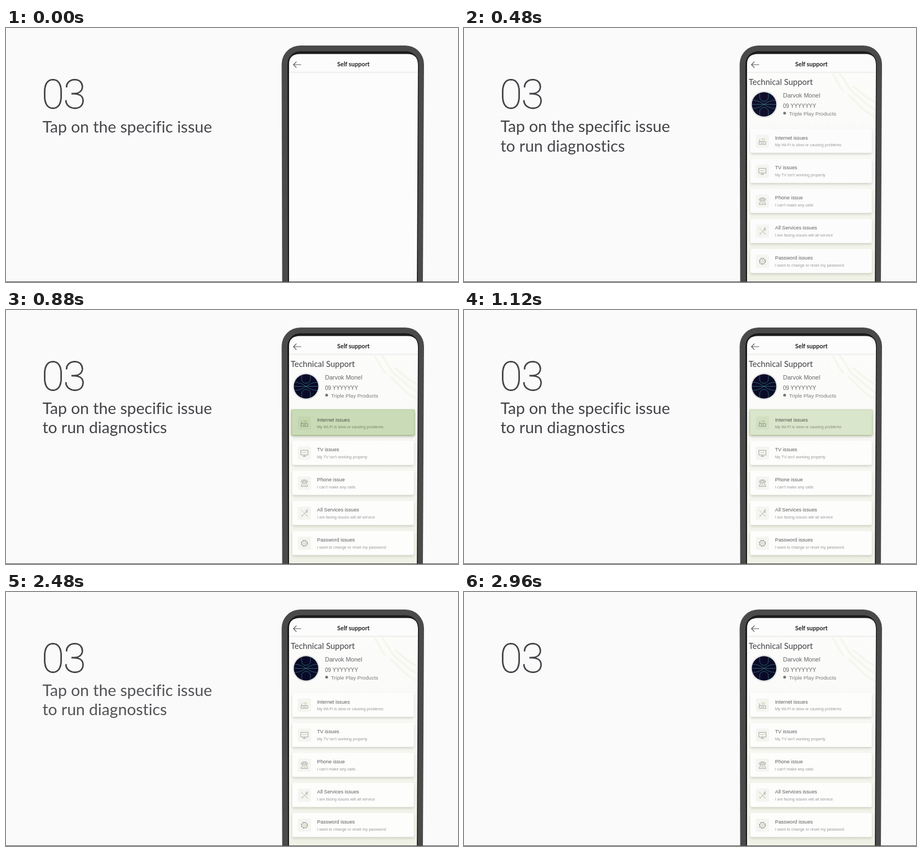
Recreate the animation shown at these times as an HTML page. Size 824 by 464 pixels, loop 3040 ms.

```html
<!DOCTYPE html>
<html lang="en">
<head>
<meta charset="utf-8">
<title>Self support</title>
<style>
  html, body { margin: 0; width: 100%; height: 100%; overflow: hidden; background: #fafafa; }
  svg { display: block; width: 824px; height: 464px; }
  text { font-family: "Liberation Sans", Arial, sans-serif; fill: #66676a; }
  .brand { font-family: Lato, sans-serif; font-variant-ligatures: none; fill: #424347; }
  .number { font: 100 75px Roboto, sans-serif; letter-spacing: -1.5px; stroke: #424347; stroke-width: .8; }
  .headline { font-size: 29.1px; }
  .label { font-size: 9.2px; fill: #5c5d60; }
  .hint { font-size: 7.33px; fill: #97989a; }
  .icon { fill: none; stroke: #8f908a; stroke-width: .8; }
  .icon .accent { stroke: #b3c788; }
  #highlight { mix-blend-mode: multiply; }
</style>
</head>
<body>
<svg viewBox="0 0 824 464">
  <defs>
    <clipPath id="screen"><path d="M516 464V66Q516 47.500 536 47.500H732Q751 47.500 751 68L749 464Z"/></clipPath>
    <linearGradient id="panel" x2="0" y2="1">
      <stop stop-color="#fcfcfb"/><stop offset=".3" stop-color="#fafaf8"/><stop offset="1" stop-color="#f0f1e6"/>
    </linearGradient>
    <linearGradient id="rule" x2="0" y2="1">
      <stop stop-color="#e9e9e8"/><stop offset="1" stop-color="#fbfbfb"/>
    </linearGradient>
    <filter id="shadow" x="-10%" y="-20%" width="120%" height="160%">
      <feDropShadow dx="0" dy="2.5" stdDeviation="2.2" flood-color="#6f735f" flood-opacity=".28"/>
    </filter>
  </defs>

  <text class="brand number" x="65" y="146.500">03</text>
  <text class="brand headline" x="66.500" y="189.500" id="line1">Tap on the specific issue</text>
  <text class="brand headline" x="66.500" y="224.500" id="line2">to run diagnostics</text>

  <path fill="#4a4a4a" d="M503.500 464L502.500 66A34 34 0 0 1 536.500 32H728A34 34 0 0 1 762 66L760 464Z"/>
  <path fill="#1b1b1b" d="M514 464L513 66A23.500 23.500 0 0 1 536.500 42.500H729A23.500 23.500 0 0 1 752.500 66L750.500 464Z"/>
  <g clip-path="url(#screen)">
    <rect x="510" y="40" width="250" height="424" fill="#fcfcfc"/>
    <g id="content">
      <rect x="510" y="82" width="250" height="382" fill="url(#panel)"/>
      <g fill="none" stroke="#f5f6ec" stroke-width="4">
        <path d="M672 84C682 98 684 108 692 116M700 122C716 132 724 152 752 163"/>
        <path d="M684 82C698 98 700 112 714 122S734 142 752 150"/>
        <path d="M708 106C722 114 730 128 752 136"/>
      </g>
      <text class="brand" x="519" y="104" font-size="15">Technical Support</text>
      <circle cx="547" cy="139.500" r="24.500" fill="#e3e3e4"/>
      <circle cx="547" cy="139.500" r="22.300" fill="#0a0a28"/>
      <g fill="none" stroke="#2f6a70" stroke-width=".9">
        <path d="M539 119V126A8 8 0 0 0 555 126V119M539 160V153A8 8 0 0 1 555 153V160"/>
        <path d="M526 132Q537 132 547 139.500T568 147M526 147Q537 147 547 139.500T568 132M525 139.500H569"/>
      </g>
      <text x="581.500" y="127" font-size="11">Darvok Monel</text>
      <text x="581.500" y="146" font-size="10">09 YYYYYYY</text>
      <circle cx="584.500" cy="155.500" r="2.600" fill="#77787a"/>
      <text x="592.500" y="159.500" font-size="9.670" style="fill:#7b7c7e">Triple Play Products</text>
      <g id="cards"></g>
    </g>
    <rect id="highlight" x="519" y="181" width="227" height="49.500" rx="3" fill="#9ec07a" filter="url(#shadow)"/>
    <rect x="510" y="80" width="250" height="3" fill="url(#rule)"/>
    <path d="M538 67H524M529.500 61.500L524 67L529.500 72.500" fill="none" stroke="#55565a" stroke-width="1.200"/>
    <text class="brand" x="633.300" y="69.500" font-size="11" font-weight="700" text-anchor="middle" style="fill:#202124">Self support</text>
  </g>
  <rect y="463" width="824" height="1" fill="#4a4a4a"/>
</svg>
<script>
const LOOP = 3040;
const $ = id => document.getElementById(id);

// Icons are centred on the origin.
const cards = [
  ['Internet issues', 'My Wi-Fi is slow or causing problems',
    '<path d="M-6 1H6V6H-6ZM-5 1V-3M-3 3.500H3"/><path class="accent" d="M-2 -4H5M-1 -1.500H4"/>'],
  ['TV issues', "My TV isn't working properly",
    '<path d="M-6.500 -5H6.500V3.500H-6.500ZM-3 6H3M0 3.500V6"/><path class="accent" d="M-4 -1H4"/>'],
  ['Phone issue', "I can't make any calls",
    '<path d="M-6 -2Q-6 -6 0 -6T6 -2H3V-4H-3V-2ZM-3 -1H3L6 6H-6Z"/><circle class="accent" cy="2.500" r="1.800"/>'],
  ['All Services issues', 'I am facing issues will all service',
    '<path d="M-5 6L3 -2M3 -2Q2 -6 6 -6L4.500 -4L6 -2.500Q5 -1 3 -2M2 2L6 6"/><path class="accent" d="M-6 -6L2 2M-6 3L-3 6"/>'],
  ['Password issues', 'I want to change or reset my password',
    '<circle r="5.600" stroke-width="1.200" stroke-dasharray="2.400 2"/><circle r="4.600"/><circle class="accent" r="1.800"/>']
];
$('cards').innerHTML = cards.map(([label, hint, icon], i) => `
  <g transform="translate(522 ${184 + i * 54.9})">
    <rect width="221.500" height="44" rx="3" fill="#fdfdfc" filter="url(#shadow)"/>
    <rect x="10" y="10.500" width="24" height="24" rx="2" fill="#f4f5f1"/>
    <g class="icon" transform="translate(22 22.500)">${icon}</g>
    <text class="label" x="45" y="19.500">${label}</text>
    <text class="hint" x="45" y="32">${hint}</text>
  </g>`).join('');

const progress = (t, from, to) => Math.min(1, Math.max(0, (t - from) / (to - from)));
const smooth = p => p * p * (3 - 2 * p);
const easeOut = p => 1 - (1 - p) ** 2;

function showLine(id, t, start) {
  const p = progress(t, start, start + 560);
  const line = $(id);
  line.setAttribute('transform', `translate(0 ${22 * (1 - easeOut(p))})`);
  line.style.opacity = Math.min(1, p * 1.3) * (1 - progress(t, 2440, 2940));
}

function draw(now) {
  const t = now % LOOP;
  showLine('line1', t, -420);
  showLine('line2', t, 60);
  $('content').style.opacity = easeOut(progress(t, 40, 560));
  $('highlight').style.opacity = .56 * progress(t, 600, 900) * (1 - smooth(progress(t, 960, 1370)));
  requestAnimationFrame(draw);
}
draw(0);
</script>
</body>
</html>
```
